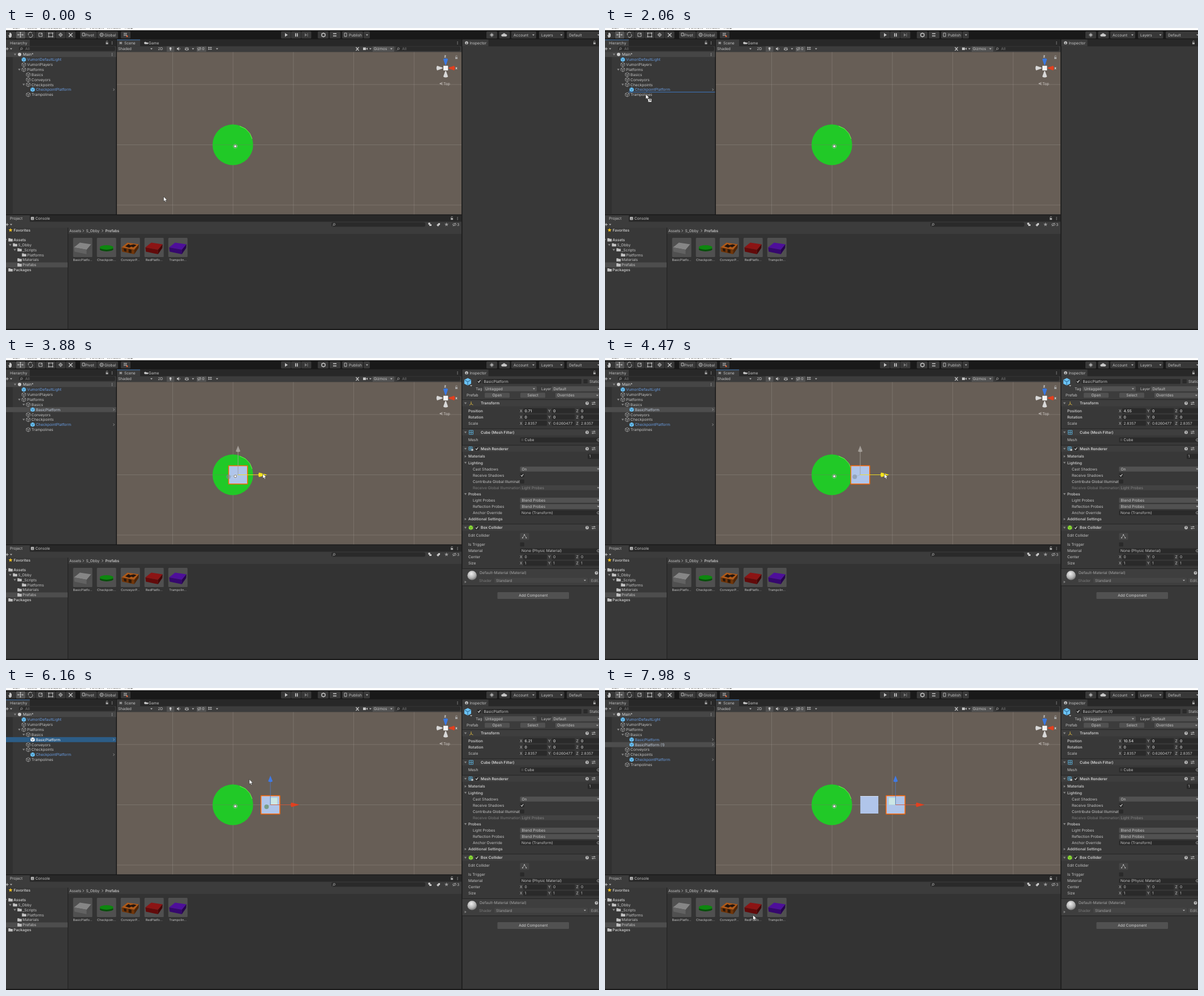
An HTML page that plays this animation: 1048x534 px, repeating every 8000 ms.

```html
<!DOCTYPE html>
<html lang="en">
<head>
<meta charset="utf-8">
<title>Scene editor</title>
<style>
html, body { margin: 0; width: 100%; height: 100%; overflow: hidden; background: #191919; }
svg { display: block; width: 100%; height: 100%; }
text { font: 6.65px Inter, sans-serif; text-rendering: geometricPrecision; white-space: pre; }
.b { font-weight: 600; }
.m { text-anchor: middle; }
.s { font-size: 5.6px; }
</style>
</head>
<body>
<svg viewBox="0 0 1048 534" xmlns="http://www.w3.org/2000/svg">
  <g id="base"></g>
  <g id="tree"></g>
  <g id="scene"></g>
  <g id="inspector"></g>
  <g id="focus"></g>
  <g id="cursor"></g>
</svg>
<script>
const INK = '#c6c6c6', DIM = '#7c7c7c', BLUE = '#6a9fe6', FIELD = '#2a2a2a', BUTTON = '#515151';

// Drawing helpers, each returns SVG markup
const rect = (x, y, w, h, fill, rx = 0, extra = '') =>
  `<rect x="${x}" y="${y}" width="${w}" height="${h}" fill="${fill}" rx="${rx}" ${extra}/>`;
const text = (x, y, s, fill = INK, cls = '') =>
  `<text x="${x}" y="${y + 2.4}" fill="${fill}" class="${cls}">${s}</text>`;
const line = (d, color = INK, w = 0.9, fill = 'none') =>
  `<path d="${d}" stroke="${color}" stroke-width="${w}" fill="${fill}"/>`;
const fill = (d, color = INK) => `<path d="${d}" fill="${color}"/>`;
const dot = (x, y, r, color = INK, extra = '') =>
  `<circle cx="${x}" cy="${y}" r="${r}" fill="${color}" ${extra}/>`;
const ring = (x, y, r, color = INK, w = 0.9, extra = '') => dot(x, y, r, 'none', `stroke="${color}" stroke-width="${w}" ${extra}`);
const caret = (x, y) => fill(`M${x - 2} ${y - 1}h4l-2 2.4z`, '#b5b5b5');
const fold = (x, y, open = true) =>
  fill(open ? `M${x - 2.2} ${y - 1.5}h4.4l-2.2 3.4z` : `M${x - 1.4} ${y - 2.2}v4.4l3.2 -2.2z`, '#858585');
const dots = (x, y) => [-2, 0, 2].map(d => dot(x, y + d, 0.6)).join('');
const lock = (x, y) => rect(x - 2, y - 0.5, 4, 3.2, '#aaa') + line(`M${x - 1.3} ${y - 0.5}v-1.2a1.4 1.4 0 0 1 2.8 0`, '#aaa', 0.7);
const lens = (x, y) => ring(x, y - 0.3, 1.7, '#aaa', 0.8) + line(`M${x - 1.2} ${y + 1}l-1.6 1.6`, '#aaa', 0.8);
const search = (x, y, w, label) => rect(x, y - 4, w, 8, FIELD, 3) + lens(x + 4.5, y) + text(x + 11, y, label, DIM);
const drop = (x, y, w, s, color = INK, bg = BUTTON) =>
  rect(x, y - 4.4, w, 8.8, bg, 1.5) + text(x + 3, y, s, color) + caret(x + w - 5, y);
const field = (x, y, w, s = '', cls = '') => rect(x, y - 4.4, w, 8.8, FIELD, 1.5) + text(x + 2.5, y, s, INK, cls);
const check = (x, y, on) =>
  rect(x - 3.5, y - 3.7, 7.4, 7.4, FIELD, 1) + (on ? line(`M${x - 2} ${y}l1.6 1.8 2.8 -4`, '#ddd', 1.1) : '');
const plus = (x, y) => line(`M${x - 2.5} ${y}h5m-2.5 -2.5v5`, INK, 1) + caret(x + 7, y);
const folder = (x, y) => fill(`M${x - 3.8} ${y - 2.8}h3l1 1h3.6v4.6h-7.6z`, '#c2c2c2');
const cube = (x, y, kind = 'plain', k = 1) => {
  const body = 'M0 -3.7L3.4 -1.9V1.9L0 3.7L-3.4 1.9V-1.9Z', seams = 'M-3.4 -1.9L0 0L3.4 -1.9M0 0V3.7';
  const [edge, bg] = {
    plain: ['#b5b5b5', 'none'], prefab: ['#2f6f9e', '#6cc3f5'], white: ['#2c5d87', '#fff'], green: ['#4d8f18', '#8fe03a']
  }[kind];
  return `<g transform="translate(${x} ${y}) scale(${k})">${line(body, kind === 'plain' ? edge : bg, 0.7, bg)}${line(seams, edge, 0.7)}</g>`;
};
const star = (x, y, color) => {
  const points = Array.from({ length: 10 }, (_, i) => {
    const a = i * Math.PI / 5, r = i % 2 ? 1.6 : 3.8;
    return `${(x + r * Math.sin(a)).toFixed(2)} ${(y - r * Math.cos(a)).toFixed(2)}`;
  });
  return fill(`M${points.join('L')}Z`, color);
};
const panel = (x, y, w, h, tabWidth, body = '#383838') =>
  rect(x, y, w, h, body) + rect(x, y, w, 12, '#282828') + rect(x, y, tabWidth, 12, '#3c3c3c');

function topBar() {
  const menu = [['Edit', 12], ['Assets', 34], ['GameObject', 60], ['Component', 104], ['VUMORI', 147], ['Window', 178], ['Help', 210]];
  let s = rect(0, 0, 1048, 4, '#fff') + menu.map(([m, x]) => text(x, -1.5, m, '#333')).join('');
  const button = (x, w, on) => rect(x, 6, w, 12.5, on ? '#565656' : '#383838', 1.5);
  [0, 17.5, 35, 52.6, 70.2, 88, 105.7].forEach((x, i) => s += button(x, 17, i === 1));
  s += fill('M4 12l2 1v-4h1v-1h1v1h1v1h1v5l-2 2h-2z');
  s += line('M21 12h9m-4.5 -4.5v9') + fill('M20 12l2 -1.5v3zM31 12l-2 -1.5v3zM25.5 7l-1.5 2h3zM25.5 17l-1.5 -2h3z');
  s += line('M40 13a3.5 3.5 0 0 1 6 -4M46.5 11a3.5 3.5 0 0 1 -6 4');
  s += line('M58 9h6v6h-6zM61 12l3 -3') + line('M75.5 9h7v6.5h-7z');
  s += dot(75.5, 9, 1.1) + dot(82.5, 15.5, 1.1) + dot(82.5, 9, 1.1) + dot(75.5, 15.5, 1.1);
  s += ring(96.5, 12, 2.5) + line('M92.5 12h8m-4 -4v8', INK, 0.6);
  s += line('M111 9l6.5 6.5M117.5 9l-6.5 6.5', INK, 1.3);
  s += button(131, 29.5) + button(161.5, 36.5) + button(203, 17);
  s += line('M135 9h4v5h-4z') + text(140, 12.3, 'Pivot') + ring(169, 12, 3) + line('M166 12h6m-3 -3v6', INK, 0.5) + text(174, 12.3, 'Global');
  s += line('M208 9.5h6m-6 3h6m-5 -4v6m3 -6v6', INK, 0.7) + dot(214, 14.5, 1.5, '#e2683c');
  s += button(486, 17.5) + button(504, 17.5) + button(522, 17.5);
  s += fill('M493 9v6.5l5 -3.2z') + fill('M511 9.3h1.7v6h-1.7zM514 9.3h1.7v6h-1.7z') + fill('M528 9.3v6l4 -3zM532.5 9.3h1v6h-1z', DIM);
  s += button(551, 19) + button(572, 19) + button(594, 37) + button(632, 11);
  s += line('M558 10.5l3 -1.5 3 1.5v3.5l-3 1.7 -3 -1.7z', INK, 1.4) + line('M578 10h6M578 14h6', INK, 1.5);
  s += line('M598 9h4v6h-4z') + text(606, 12.3, 'Publish') + caret(638, 12.3);
  s += button(849, 19) + button(871.5, 19) + ring(858.5, 12.3, 1.8) + line('M858.5 8.5v7.6M854.7 12.3h7.6M856 9.8l5 5m0 -5l-5 5', INK, 0.6);
  s += fill('M877 15a2 2 0 0 1 .5 -4a3 3 0 0 1 5.5 0a2 2 0 0 1 .8 4z');
  [[893, 44, 'Account'], [942, 44.5, 'Layers'], [991, 60, 'Default']].forEach(([x, w, label]) =>
    s += button(x, w) + text(x + 4, 12.3, label) + caret(x === 991 ? 1047 : x + w - 5, 12.3));
  return s;
}

function hierarchyFrame() {
  return panel(0, 20.5, 194.5, 309, 42) + text(7, 26.5, 'Hierarchy') + lock(178.5, 26) + dots(187.5, 26.3)
    + rect(0, 32.5, 194.5, 9.5, '#3c3c3c') + plus(2, 36.8) + search(23, 36.8, 170, 'All')
    + rect(0, 42, 12, 287.5, '#303030');
}

function sceneFrame() {
  let s = panel(196, 20.5, 609, 309, 41) + line('M201 24l3.5 5m0 -5l-3.5 5m-1 -2.5h5.5', INK, 0.8) + text(209, 26.5, 'Scene');
  s += fill('M244 26.5a2.2 2.2 0 0 1 4 -1h2a1 1 0 0 1 0 3h-5z') + text(252, 26.5, 'Game') + dots(798, 26.3);
  s += rect(196, 32.5, 609, 10, '#3c3c3c') + text(198, 36.8, 'Shaded') + caret(257, 36.8) + text(268.5, 36.8, '2D');
  s += rect(284, 32.5, 13.5, 9.5, BUTTON) + dot(290.7, 36, 1.9) + rect(289.8, 37.5, 1.8, 2.2, INK);
  s += fill('M302 35.5h1.5l2 -2v6.5l-2 -2h-1.5z') + line('M306.5 35a2 2 0 0 1 0 3.5', INK, 0.7);
  s += line('M316 38l3.5 -1.5 3.5 1.5 -3.5 1.5zM316 36l3.5 -1.5 3.5 1.5') + caret(330.5, 36.8);
  s += rect(337, 32.5, 17, 9.5, BUTTON) + line('M338 36.8q3.5 -4 7 0q-3.5 4 -7 0M339 40l5 -6', INK, 0.7) + text(346.5, 36.8, '0');
  s += line('M357 34.5h7m-7 3h7m-5.5 -4.5v6m3.5 -6v6', INK, 0.7) + caret(373, 36.8);
  s += line('M618.5 34l5 6M623.5 34l-5 6', INK, 1.2) + fill('M631 34.5h5v4.5h-5zM636.5 36.8l2.5 -2v4z') + caret(644, 36.8);
  s += rect(648, 32.5, 38, 9.5, BUTTON) + text(650, 36.8, 'Gizmos') + caret(681, 36.8) + search(689, 36.8, 114, 'All');
  s += rect(196, 42.5, 609, 287, '#675e56');
  const grid = 'rgba(175,170,165,.34)';
  [294.5, 401.2, 507.9, 614.5, 721.2].forEach(x => s += rect(x - 0.4, 42.5, 0.8, 287, grid));
  [100, 206.5, 313].forEach(y => s += rect(196, y - 0.4, 609, 0.8, grid));
  s += rect(773, 66.8, 8.2, 8.2, '#f2f2f2');
  s += fill('M772.8 55q4.2 -3 8.4 0l-3.5 10.5h-1.4z', '#3b78e0') + fill('M772.8 86q4.2 3 8.4 0l-3.5 -10h-1.4z', '#d8d8d8');
  s += fill('M762 66.7q-2.6 4 0 8.2l9.5 -3.5v-1.4z', '#d8d8d8') + fill('M792 66.7q2.6 4 0 8.2l-9.5 -3.5v-1.4z', '#e2401f');
  s += text(774.2, 50, 'z', '#eee', 'b') + text(794, 70.5, 'x', '#eee', 'b') + lock(796, 52);
  s += line('M771.5 96l-5 2.3 5 2.3M771.5 98.3h-4.5', '#d0ccc8', 0.7) + text(773, 98.3, 'Top', '#d0ccc8');
  return s;
}

function projectFrame() {
  let s = panel(0, 331, 805, 201, 42, '#333') + text(7, 337, 'Project');
  s += rect(44, 334, 5.5, 5.5, INK, 1) + line('M45 336h3.5m-3.5 2h3.5', '#333', 0.6) + text(52, 337, 'Console') + lock(788, 336.5) + dots(798, 336.8);
  s += rect(0, 342.5, 805, 10.5, '#3c3c3c') + plus(2, 347.5) + rect(575, 343.5, 166, 8, FIELD, 3) + lens(580, 347.5);
  s += dot(748, 346, 2) + rect(748, 347, 4, 3, INK) + fill('M761 348.5l3.5 -3.5h2.5v2.5l-3.5 3.5z') + star(778.5, 347.5, '#999');
  s += line('M789 347.5q3.5 -4 7 0q-3.5 4 -7 0M790 350.5l5 -6', INK, 0.7) + text(797, 347.5, '3');
  s += rect(0, 353, 109, 179, '#383838') + rect(109, 353, 1, 179, '#202020') + rect(110, 353, 695, 11, '#3c3c3c');
  s += text(112, 358.6, 'Assets') + text(141.5, 358.6, 'S_Obby') + text(175.5, 358.6, 'Prefabs', INK, 'b');
  s += line('M135.5 356.5l2 2 -2 2M169.5 356.5l2 2 -2 2', INK, 0.8);
  s += rect(0, 414.5, 109, 8.8, '#4d4d4d');
  s += star(8, 357.4, '#f0c020') + text(13.5, 357.4, 'Favorites', INK, 'b');
  [['Assets', 0, 'b'], ['S_Obby', 1], ['_Scripts', 2], ['Platforms', 3], ['Materials', 2], ['Prefabs', 2], ['Packages', 0, 'b']]
    .forEach(([name, depth, cls], i) => {
      const x = 8 + 8 * depth, y = 374.6 + 8.86 * i;
      s += folder(x, y) + text(x + 5.3, y, name, INK, cls) + (i < 3 ? fold(x - 8.5, y) : '');
    });
  return s + thumbnails();
}

function thumbnails() {
  const slab = (x, top, front, side) => fill(`M${x + 1.5} 388l10.5 -8.5 20 3 -8 9.5z`, top)
    + fill(`M${x + 1.5} 388l22.5 4v8l-21.5 -4.5z`, front) + fill(`M${x + 24} 392l8 -9.5 -.5 6.5 -7.5 11z`, side);
  const disc = (x, y, color) => `<ellipse cx="${x}" cy="${y}" rx="12" ry="3.9" fill="${color}"/>`;
  const items = [['BasicPlatfo…', '#868686', '#626262', '#4e4e4e'], ['Checkpoin…'], ['ConveyorP…', '#b05a18', '#713508', '#4f2405'],
    ['RedPlatfo…', '#8c1414', '#620a0a', '#450606'], ['Trampolin…', '#4e0f9a', '#35076e', '#26044f']];
  return items.map(([name, ...shades], i) => {
    const x = 118.6 + 42.05 * i;
    let s = rect(x, 371, 34, 34, '#505050', 1.5) + text(x + 17, 409.8, name, INK, 'm s');
    s += shades.length ? slab(x, ...shades) : disc(x + 17, 391, '#07500a') + disc(x + 17, 388, '#0d870f');
    if (i === 2) s += fill(`M${x + 8} 386l6 -4 3 2 6 -1.5 5 1.5 -6 4 -3 -1.5 -4 2z`, '#241610') + fill(`M${x + 5} 389.5l5 1v5l-4 -1zM${x + 14} 391l5 1v6l-5 -1z`, '#2c180a');
    return s;
  }).join('');
}

function componentHeader(y, title, on) {
  return rect(806.5, y - 6, 242, 11.5, '#3e3e3e') + rect(806.5, y - 6.6, 242, 0.7, '#1d1d1d') + fold(812, y)
    + (on ? check(832, y, true) : '') + text(839, y, title, '#d4d4d4', 'b')
    + dot(1027, y, 2.9, '#c0c0c0') + text(1027, y, '?', '#333', 'm b s')
    + line(`M1035 ${y - 1.5}h7m-7 3h7M1039.5 ${y - 3}v3M1037 ${y}v3`, INK, 0.8);
}

function inspectorBody(name, posX) {
  const label = (y, s, x = 825, color = INK, cls = '') => text(x, y, s, color, cls);
  const xyz = (y, title, values, cls) => label(y, title, 817, INK, cls)
    + [[908, 914, 42, 'X'], [958, 964.5, 41, 'Y'], [1007.5, 1013.5, 36, 'Z']]
      .map(([lx, x, w, axis], i) => text(lx, y, axis) + field(x, y, w, values[i], cls)).join('');
  const object = (y, s) => field(908.5, y, 138, s) + ring(1046.5, y, 2, INK, 0.7);
  let s = rect(806.5, 32.5, 242, 41, '#3c3c3c') + cube(816, 42, 'prefab', 1.6) + caret(822, 49);
  s += check(836, 41.3, true) + field(842, 41.3, 175, name) + check(1024, 41.3) + text(1031, 41.3, 'Static');
  s += text(830, 54.4, 'Tag') + drop(844, 54.4, 94, 'Untagged') + text(946, 54.4, 'Layer') + drop(964.5, 54.4, 88, 'Default');
  s += text(814, 66, 'Prefab') + rect(846, 61.5, 44, 8.8, BUTTON, 1.5) + text(868, 66, 'Open', INK, 'm')
    + rect(909, 61.5, 44, 8.8, BUTTON, 1.5) + text(931, 66, 'Select', INK, 'm') + drop(971, 66, 79, 'Overrides');
  s += componentHeader(80, 'Transform') + line('M822 77v4l-3 2.5m3 -2.5l3.5 2', '#d0b040', 1);
  s += xyz(93.2, 'Position', [posX, '0', '0'], 'b') + xyz(104.3, 'Rotation', ['0', '0', '0'], 'b') + xyz(115.4, 'Scale', ['2.8357', '0.6260477', '2.8357']);
  s += componentHeader(131.4, 'Cube (Mesh Filter)') + line('M818.5 128h7v7h-7zM818.5 131.5h7M822 128v7', '#5ab0dc', 0.9);
  s += label(144.9, 'Mesh', 817) + object(144.9, '&#160;&#160;&#160;Cube') + rect(910.5, 142.5, 4, 4.5, '#444');
  s += componentHeader(160.4, 'Mesh Renderer', true) + line('M818 157h6v6h-6zM818 160h6M821 157v6', '#5ab0dc', 0.9) + dot(824, 162.5, 1.8);
  s += fold(812, 174, false) + text(817, 174, 'Materials', INK, 'b') + field(1028, 174, 24, '1');
  s += fold(812, 185.2) + text(817, 185.2, 'Lighting', INK, 'b');
  s += label(196.3, 'Cast Shadows') + drop(908.5, 196.3, 143, 'On') + label(207.4, 'Receive Shadows') + check(912, 207.4, true);
  s += label(218.4, 'Contribute Global Illuminat') + check(912, 218.4);
  s += label(229.4, 'Receive Global Illumination', 825, DIM) + drop(908.5, 229.4, 143, 'Light Probes', '#858585', '#434343');
  s += fold(812, 240.5) + text(817, 240.5, 'Probes', INK, 'b');
  s += label(251.5, 'Light Probes') + drop(908.5, 251.5, 143, 'Blend Probes') + label(262.6, 'Reflection Probes') + drop(908.5, 262.6, 143, 'Blend Probes');
  s += label(273.7, 'Anchor Override') + object(273.7, 'None (Transform)');
  s += fold(812, 284.9, false) + text(817, 284.9, 'Additional Settings', INK, 'b');
  s += componentHeader(300, 'Box Collider', true) + cube(821.5, 300, 'green');
  s += label(313.7, 'Edit Collider', 817) + rect(908.5, 309.5, 16, 12, '#454545', 1.5) + line('M913 318l3.2 -5.5 3.2 5.5', INK, 0.7)
    + dot(913, 318, 0.9) + dot(916.2, 312.5, 0.9) + dot(919.4, 318, 0.9);
  s += label(329.6, 'Is Trigger', 817) + check(912, 329.6) + label(340.9, 'Material', 817) + object(340.9, 'None (Physic Material)');
  s += xyz(352, 'Center', ['0', '0', '0']) + xyz(363, 'Size', ['1', '1', '1']);
  s += rect(806.5, 372.5, 242, 30, '#3e3e3e') + rect(806.5, 372, 242, 0.8, '#1d1d1d') + rect(806.5, 402.5, 242, 0.8, '#1d1d1d');
  s += dot(823.7, 384.5, 8.3, 'url(#ball)') + text(837, 380, 'Default-Material (Material)', '#a8a8a8') + fold(812, 396, false)
    + dot(1043.5, 380, 2.9, '#c0c0c0') + text(1043.5, 380, '?', '#333', 'm b s');
  s += text(836, 393.2, 'Shader', DIM) + drop(863, 393.2, 165, 'Standard', '#a0a0a0', '#454545') + rect(1031, 388.8, 20, 8.8, '#454545', 1.5) + text(1034, 393.2, 'Edit...', '#a0a0a0');
  return s + rect(868.5, 414, 126.5, 12, BUTTON, 1.5) + text(931.8, 420, 'Add Component', '#d4d4d4', 'm');
}

// Motion: [time, x, y, linear?]
const MOUSE = [[0, 278.5, 298], [150, 278.5, 298], [190, 277, 296], [730, 277, 296], [1020, 138, 388], [1090, 138, 388],
  [1500, 92, 165], [2060, 72, 117], [2240, 72, 117], [2650, 72, 84.5], [2880, 72, 84.5], [3610, 445, 204.5], [3750, 445, 204.5],
  [4470, 493.5, 204.5, 1], [4850, 510, 205.5, 1], [4930, 510, 205.5], [5280, 424, 176], [5640, 80, 90], [5730, 80, 90],
  [6100, 430, 161.5], [6250, 430, 161.5], [6870, 511.5, 207.5], [6990, 511.5, 207.5], [7400, 557.7, 207.5, 1], [7470, 557.7, 207.5],
  [7770, 363, 360], [7980, 261.5, 401.5], [8000, 261.5, 401.5]];
const ORIGIN = 401, UNIT = 10.67, FIRST_X = ORIGIN + 6.21 * UNIT, SECOND_X = ORIGIN + 10.54 * UNIT;
const PLATFORM = [[0, ORIGIN, 0], [3750, ORIGIN, 0], [4470, 451, 0, 1], [4850, FIRST_X, 0, 1], [6990, FIRST_X, 0], [7400, SECOND_X, 0, 1], [8000, SECOND_X, 0]];

function at(keys, t) {
  const i = Math.max(1, keys.findIndex(k => k[0] > t));
  const [a, b] = [keys[i - 1], keys[i]];
  let p = (t - a[0]) / (b[0] - a[0]);
  if (!b[3]) p = p * p * (3 - 2 * p);
  return [a[1] + (b[1] - a[1]) * p, a[2] + (b[2] - a[2]) * p];
}
const within = (t, a, b) => t >= a && t < b;
const treeFocused = t => within(t, 1450, 3700) || within(t, 5660, 6920);

function tree(t) {
  const placed = t >= 2920, doubled = t >= 6300;
  const rows = [['VumoriDefaultLight', 0, 1], ['VumoriPlayers', 0], ['Platforms', 0, 0, 1], ['Basics', 1, 0, placed]];
  if (placed) rows.push(['BasicPlatform', 2, 1]);
  if (doubled) rows.push(['BasicPlatform (1)', 2, 1]);
  rows.push(['Conveyors', 1], ['Checkpoints', 1, 0, 1], ['CheckpointPlatform', 2, 1], ['Trampolines', 1]);
  const chosen = placed ? (doubled ? 5 : 4) : -1, active = treeFocused(t);
  let s = rect(0, 42.3, 194.5, 9, '#464646') + fold(16, 46.8) + dot(24, 46.8, 3, '#d0d0d0') + text(30, 46.8, 'Main*', '#e0e0e0') + dots(187.5, 46.8);
  if (within(t, 2860, 2920)) s += rect(0, 78, 194.5, 8.9, '#454545') + ring(7, 82.5, 1.8, '#666', 0.8);
  rows.forEach(([name, depth, prefab, open], i) => {
    const x = 31.5 + 7.8 * depth, y = +(55.8 + 8.86 * i).toFixed(2), on = i === chosen;
    if (on) s += rect(0, y - 4.4, 194.5, 8.9, active ? '#2c5d87' : '#4d4d4d');
    s += cube(x, y, on && active ? 'white' : prefab ? 'prefab' : 'plain') + (open ? fold(x - 8, y) : '');
    s += text(x + 5.8, y, name, on ? (active ? '#fff' : '#c3cfe0') : prefab ? BLUE : INK);
    if (depth === 2) s += line(`M189.5 ${y - 2}l2 2 -2 2`, '#aaa', 0.8);
  });
  const insert = (x, y) => ring(x + 1.5, y, 1.4, '#4a82c8', 0.8) + rect(x + 3, y - 0.5, 194.5 - x - 3, 1, '#3f79c4');
  if (within(t, 1900, 2350)) s += insert(42, 113.3);
  if (within(t, 2350, 2860)) s += insert(34, 87);
  return s;
}

function gizmo(x, dragging) {
  const red = dragging ? '#f4e41c' : '#e2401f', blue = dragging ? '#a39d97' : '#3f7ae6';
  const away = 505 - x, cx = x - away * 0.18;
  let s = '';
  if (away > 0) s += line(`M${x} 206.5L${cx} 210`, '#9fb8a8', 0.6) + dot(cx, 210, 4, dragging ? '#7d8899' : '#4d7d3c', 'opacity=".55"');
  if (!dragging) s += rect(away > 0 ? x : x - 12, 194, 12.5, 12.5, '#d5f0e4', 0, 'opacity=".8" stroke="#a9dcd0" stroke-width=".6"');
  s += line(`M${x} 206.5V165`, dragging ? blue : '#5476b4', 0.9) + fill(`M${x - 4} 165q4 2.5 8 0l-4 -10z`, blue);
  return s + line(`M${x} 206.5h37`, dragging ? red : '#d2553a', 0.9) + fill(`M${x + 37} 202.5q-2 4 0 8l14.5 -4z`, red);
}

function scene(t) {
  let s = dot(400.9, 206.5, 35.9, '#21c927') + line('M413 173.5L423 178 431 186.5 435 196', '#6cf04a', 1) + rect(365, 206.1, 72, 0.8, 'rgba(90,140,80,.7)');
  const x = at(PLATFORM, t)[0];
  if (t >= 6300) s += rect(FIRST_X - 16, 191, 31.8, 31, '#b0c5ea') + rect(FIRST_X - 16, 191, 31.8, 1, '#d5e0f4');
  if (t >= 2860) {
    s += rect(x - 16.6, 190.5, 33.3, 32.2, '#b0c5ea', 0.5, 'stroke="#ff6a0a" stroke-width="1.5"');
    if (t < 2920) s += line('M396.5 209V196h17v9M418.5 191v31', '#f26a30', 0.8);
    s += gizmo(x, within(t, 3730, 4900) || within(t, 6970, 7430));
  }
  return s + ring(405.2, 209.2, 3.5, '#e8e8e8', 0.9, 'stroke-dasharray="1.2 1"') + dot(405.2, 209.2, 2.4, '#f4f4f4', 'stroke="#444" stroke-width=".7"');
}

function inspector(t) {
  if (t < 2860) return '';
  // The readout trails the handle slightly
  const pos = (at(PLATFORM, t - 22.5)[0] - ORIGIN) / UNIT;
  return inspectorBody(t >= 6300 ? 'BasicPlatform (1)' : 'BasicPlatform', String(+pos.toFixed(2)));
}

function focus(t) {
  const [x, y, w] = within(t, 1050, 1450) ? [0, 331, 42] : treeFocused(t) ? [0, 20.5, 42] : [196, 20.5, 41];
  return rect(x, y, w, 1, '#3a72b0');
}

function cursor(t) {
  const [x, y] = at(MOUSE, t);
  let s = line('M0 0V8.7L2 6.9 3.4 9.9 4.9 9.2 3.6 6.4H6.4Z', '#222', 0.6, '#fff');
  if (within(t, 1110, 2860)) s += rect(4, 8, 6.5, 6, '#fff', 0.5, 'stroke="#222" stroke-width=".7"') + line('M5.5 12.5l3 -2.8m-2.5 0h2.7v2.5', '#222', 0.8);
  return `<g transform="translate(${x.toFixed(2)} ${y.toFixed(2)})">${s}</g>`;
}

document.getElementById('base').innerHTML =
  '<radialGradient id="ball" cx=".42" cy=".32" r=".75"><stop stop-color="#f0f0f0"/><stop offset=".6" stop-color="#b0b0b0"/><stop offset="1" stop-color="#606060"/></radialGradient>'
  + rect(0, 0, 1048, 534, '#191919') + topBar() + hierarchyFrame() + sceneFrame() + projectFrame()
  + panel(806.5, 20.5, 242, 511.5, 46) + dot(814, 26.3, 2.8) + rect(813.4, 25.5, 1.2, 3, '#333') + text(819.5, 26.5, 'Inspector') + lock(1040, 26);

const layers = Object.entries({ tree, scene, inspector, focus, cursor })
  .map(([id, draw]) => ({ node: document.getElementById(id), draw, last: null }));
const start = performance.now();

function frame(now) {
  const t = Math.max(0, now - start) % 8000;
  for (const layer of layers) {
    const markup = layer.draw(t);
    if (markup !== layer.last) layer.node.innerHTML = layer.last = markup;
  }
  requestAnimationFrame(frame);
}
frame(start);
</script>
</body>
</html>
```
